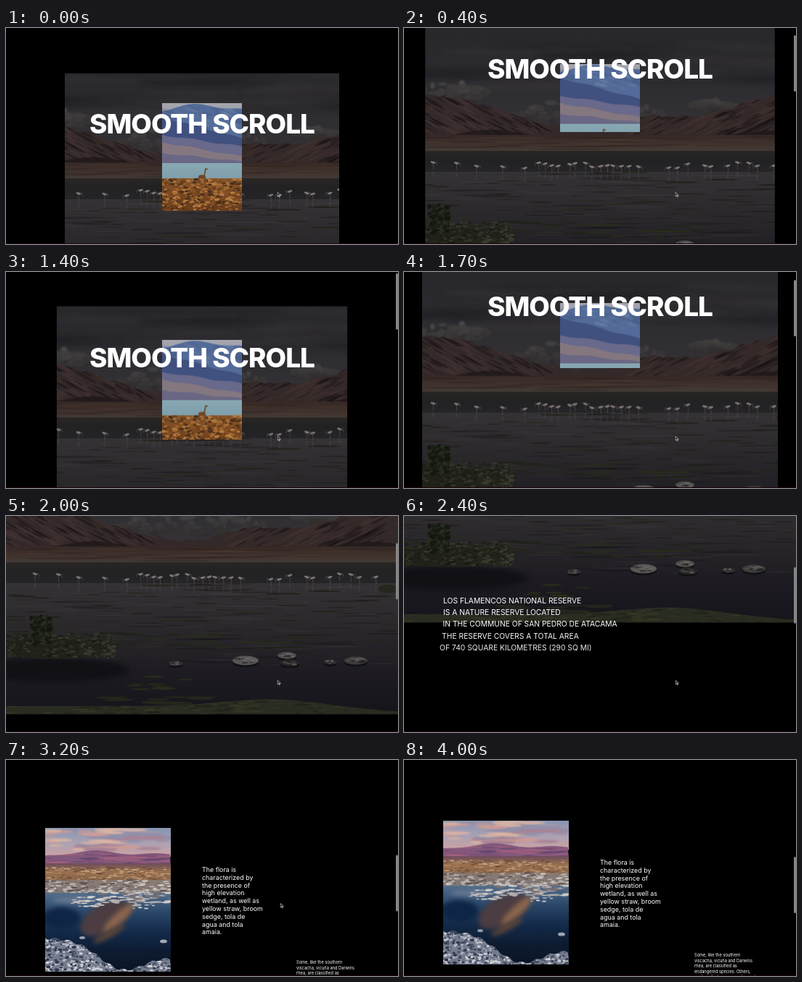
These frames come from a looping animation (540 by 299 pixels, 4100 ms). An HTML page with a canvas:

```html
<!DOCTYPE html>
<html lang="en">
<head>
<meta charset="utf-8">
<title>Smooth scroll</title>
<style>
html, body { margin: 0; width: 100%; height: 100%; overflow: hidden; background: #000; }
#stage { position: relative; width: 540px; height: 299px; overflow: hidden; color: #fff; font-family: Inter, sans-serif; }
#stage > * { position: absolute; left: 0; top: 0; margin: 0; white-space: pre; }
#title { width: 540px; text-align: center; font: 800 37px/37px Inter, sans-serif; letter-spacing: -1px; }
#facts { left: 54px; font-size: 10.3px; line-height: 16.2px; }
#flora { left: 270px; font-size: 8.9px; line-height: 10.8px; }
#fauna { left: 400px; font-size: 5.7px; line-height: 7.6px; }
#stage > #thumb { left: 537px; width: 3px; height: 78px; border-radius: 2px; background: #858585; }
#stage > #edge { top: 298px; width: 540px; height: 1px; background: #1b0509; }
</style>
</head>
<body>
<div id="stage">
<canvas id="view" width="540" height="299"></canvas>
<h1 id="title">SMOOTH SCROLL</h1>
<div id="facts"><div>LOS FLAMENCOS NATIONAL RESERVE</div><div>IS A NATURE RESERVE LOCATED</div><div>IN THE COMMUNE OF SAN PEDRO DE ATACAMA</div><div>THE RESERVE COVERS A TOTAL AREA</div><div>OF 740 SQUARE KILOMETRES (290 SQ MI)</div></div>
<p id="flora">The flora is
characterized by
the presence of
high elevation
wetland, as well as
yellow straw, broom
sedge, tola de
agua and tola
amaia.</p>
<p id="fauna">Some, like the southern
viscacha, vicuña and Darwins
rhea, are classified as
endangered species. Others,
such as Andean goose, horned</p>
<div id="edge"></div>
<div id="thumb"></div>
<svg id="cursor" width="6" height="8" viewBox="0 0 6 8"><path d="M.5.5V6L1.9 4.8 2.9 7 3.8 6.6 2.9 4.5H4.8Z" fill="#111" stroke="#ddd" stroke-width=".7"/></svg>
</div>
<script>
const $ = id => document.getElementById(id);
const clamp = (v, lo = 0, hi = 1) => Math.min(hi, Math.max(lo, v));
const bell = (x, mid, width) => Math.exp(-(((x - mid) / width) ** 2));
const LOOP = 4100, STEP = 100, W = 540, H = 299, BG_H = H * 1.4;

// ---- painting helpers ----
function picture(w, h, seed, draw) {
  const canvas = document.createElement('canvas');
  canvas.width = w;
  canvas.height = h;
  const c = canvas.getContext('2d');
  const rnd = (lo = 0, hi = 1) => {
    seed = (seed * 16807) % 2147483647;
    return lo + (hi - lo) * seed / 2147483647;
  };
  const band = (y0, y1, ...colors) => {
    const g = c.createLinearGradient(0, y0, 0, y1);
    colors.forEach((color, i) => g.addColorStop(i / (colors.length - 1), color));
    c.fillStyle = g;
    c.fillRect(0, y0, w, y1 - y0);
  };
  const blob = (color, x, y, rx, ry, turn = 0) => {
    c.fillStyle = color;
    c.beginPath();
    c.ellipse(x, y, rx, ry, turn, 0, 7);
    c.fill();
  };
  // area below the curve top(x), with optional detail clipped to it
  const ground = (top, bottom, color, detail) => {
    c.save();
    c.fillStyle = color;
    c.beginPath();
    c.moveTo(0, bottom);
    for (let x = 0; x <= w; x += 2) c.lineTo(x, top(x));
    c.lineTo(w, bottom);
    c.fill();
    c.clip();
    if (detail) detail();
    c.restore();
  };
  const scatter = (n, colors, x0, y0, x1, y1, rx, ry, turn = 0) => {
    for (let i = 0; i < n; i++) {
      const k = rnd(.4, 1.2);
      blob(colors[i % colors.length], rnd(x0, x1), rnd(y0, y1), rx * k, ry * k, turn);
    }
  };
  const soft = (px, paint) => {
    c.filter = `blur(${px}px)`;
    paint();
    c.filter = 'none';
  };
  draw({ c, rnd, band, blob, ground, scatter, soft });
  return canvas;
}

const lagoon = picture(W, 419, 11, ({ c, rnd, band, blob, ground, scatter, soft }) => {
  band(0, 190, '#262629', '#2b2a2e', '#353337');
  soft(3, () => scatter(30, ['rgba(75,70,70,.16)', 'rgba(22,22,28,.2)'], 0, 60, W, 125, 90, 5));

  const cloud = (cx, cy, rx, ry) => soft(1.2, () => {
    for (let i = 0; i < 70; i++) {
      const u = rnd(-1, 1), v = rnd(-1, 1) * (1 - u * u), light = 58 - 13 * v + rnd(-5, 5);
      blob(`rgb(${light},${light - 2},${light - 2})`, cx + u * rx, cy + v * ry, rnd(3, 9), rnd(2, 5));
    }
  });
  cloud(65, 128, 55, 15);
  cloud(255, 156, 105, 20);
  cloud(425, 146, 30, 8);

  const ridge = x => 185 - 53 * bell(x, 40, 135) - 17 * bell(x, 335, 55) - 60 * bell(x, 560, 155)
    + 1.3 * Math.sin(x / 7) + Math.sin(x / 3.1);
  ground(ridge, 200, '#342929', () => {
    scatter(160, ['rgba(70,54,53,.4)', 'rgba(22,17,20,.45)'], 0, 135, 200, 185, 15, 2, .5);
    scatter(160, ['rgba(68,50,48,.4)', 'rgba(20,16,18,.45)'], 300, 130, W, 185, 15, 2, -.45);
  });
  ground(x => 190 - 11 * bell(x, 120, 55) - 10 * bell(x, 505, 60), 200, 'rgba(30,23,25,.75)');
  band(186, 208, '#352825', '#3e302b', '#433a35');
  scatter(40, ['rgba(85,65,55,.25)', 'rgba(35,26,24,.3)'], 0, 188, W, 206, 45, 1);
  band(208, 237, '#282724', '#222123', '#252427');
  band(237, 419, '#353235', '#2b282c', '#1e1c22', '#15141a');
  scatter(110, ['rgba(75,70,72,.2)', 'rgba(12,12,16,.3)'], 0, 240, W, 350, 32, 1);
  scatter(90, ['#25251f', '#1f201a', '#2b2a22'], 0, 238, W, 322, 20, 1);
  scatter(26, ['#292b1d', '#20231a'], 150, 306, 420, 330, 20, 1.4);
  scatter(9, ['#262b1a'], 160, 365, 250, 384, 14, 1.6);

  const flock = (n, x0, x1) => {
    for (let i = 0; i < n; i++) {
      const x = x0 + (x1 - x0) * (i + rnd(-.3, .3)) / (n - 1), y = 227 + rnd(-4, 5), dir = rnd() < .5 ? -1 : 1;
      c.lineWidth = .6;
      c.strokeStyle = '#5f5858';
      c.beginPath();
      c.moveTo(x, y + 1);
      c.lineTo(x + .5, y + 10);
      c.moveTo(x + 3 * dir, y);
      c.quadraticCurveTo(x + 6 * dir, y - 3, x + 5 * dir, y + 4);
      c.stroke();
      blob('#7d7575', x, y, 3.5, 1.5, .3 * dir);
      blob('rgba(110,102,104,.15)', x, y + 16, 1.5, 4);
    }
  };
  flock(5, 35, 163);
  flock(14, 183, 323);
  flock(10, 364, 505);

  soft(4, () => blob('#111015', 65, 357, 105, 17));
  blob('#20211a', 65, 326, 90, 16);
  scatter(330, ['#292b20', '#191b15', '#33342a', '#202319'], 0, 307, 148, 339, 3.5, 1.6);
  scatter(80, ['#393a2f', '#23251c'], 100, 320, 152, 340, 3, 1.6);
  scatter(190, ['#1c2017', '#282c20', '#14170f'], 34, 282, 62, 322, 3, 2.5);
  blob('#26271f', 526, 245, 13, 6);

  const rock = (x, y, r, light) => {
    blob('#111115', x, y + 3, r, r * .35);
    blob(`rgb(${light},${light - 2},${light - 3})`, x, y, r, r * .36);
    scatter(14, ['rgba(125,120,118,.4)', 'rgba(25,25,29,.45)'], x - r * .7, y - r * .2, x + r * .7, y + r * .25, r * .25, 1.2);
  };
  rock(330, 344, 18, 88);
  rock(387, 337, 13, 82);
  rock(391, 347, 13, 42);
  rock(482, 344, 16, 62);
  rock(447, 346, 9, 55);
  rock(234, 348, 9, 70);

  scatter(14, ['#23261c'], 130, 394, 310, 404, 20, 2);
  ground(x => 407 - 11 * bell(x, 370, 95) + 8 * (x / W) ** 4, 419, '#292c20', () =>
    scatter(160, ['#333624', '#21241a'], 0, 396, W, 419, 8, 1.2));
});

const vicuna = picture(110, 149, 5, ({ c, band, blob, ground, scatter, soft }) => {
  const layer = (color, left, right) => ground(x => left + (right - left) * x / 110 + Math.sin(x / 9), 86, color);
  band(0, 86, '#a4a5ae', '#848b9f');
  ground(x => 14 - 13 * bell(x, 45, 36) - 6 * bell(x, 110, 30), 86, '#536b98');
  soft(1, () => scatter(40, ['rgba(125,145,180,.35)', 'rgba(50,66,112,.25)'], 5, 6, 110, 36, 10, 2, .3));
  layer('#40507f', 19, 49);
  layer('#68698b', 44, 60);
  layer('#84777f', 54, 74);
  layer('#696784', 69, 81);
  band(83, 105, '#88a8b3', '#7e9eac');
  band(104, 149, '#885a31', '#794720', '#653a1b');
  scatter(420, ['#a36b35', '#6d421f', '#49301b', '#b47b40', '#875021'], 0, 105, 110, 149, 3.2, 1.7);
  c.strokeStyle = '#6f4829';
  c.lineWidth = 1.7;
  blob('#6f4829', 55, 102, 5, 2.8);
  c.beginPath();
  for (const x of [51, 59]) {
    c.moveTo(x, 102);
    c.lineTo(x, 111);
  }
  c.moveTo(58, 101);
  c.lineTo(60, 91);
  c.lineTo(63, 91.5);
  c.stroke();
});

const saltFlat = picture(173, 199, 23, ({ band, blob, ground, scatter, soft }) => {
  band(0, 40, '#8795b2', '#a9a1b4', '#cda3a3');
  soft(1, () => scatter(50, ['#cb9c99', '#9190aa', '#d9b4a4', '#a98394'], 0, 2, 173, 30, 22, 2.5));
  ground(x => 38 - 7 * bell(x, 70, 32) - 3 * bell(x, 150, 25), 55, '#83587b', () =>
    scatter(35, ['rgba(180,100,125,.4)', 'rgba(75,58,105,.35)'], 0, 36, 173, 49, 16, 1.5));
  band(49, 73, '#6c4c5b', '#99704e', '#856348');
  scatter(280, ['#b48d6b', '#6b4b37', '#9d7250', '#c7a685'], 0, 54, 173, 75, 3.5, .8);
  band(72, 92, '#8b7a6f', '#817c80');
  scatter(260, ['#bcb3ae', '#81746f', '#cfc7c2', '#5f5656'], 0, 72, 173, 92, 4, 1.1);
  band(90, 199, '#526d8c', '#294668', '#132a49', '#0d1b31', '#0b1424');
  soft(3, () => {
    blob('#4c3d42', 83, 125, 38, 20, -.5);
    blob('#89654d', 102, 124, 29, 7, -.75);
    blob('#574539', 88, 147, 25, 5, -.5);
    blob('#6b7b93', 40, 100, 30, 4);
    blob('#0f2545', 22, 125, 26, 15);
  });
  scatter(80, ['#b1acad', '#d0cac5', '#777174'], 75, 88, 173, 104, 6, 1.2);
  scatter(26, ['#bdb9b9', '#d8d4d0'], 36, 95, 78, 109, 5, 1);
  scatter(10, ['#a8a9b0', '#cfcdce'], 120, 103, 172, 112, 4, 1.2);
  blob('#a3a6b0', 163, 157, 5, 2.5);
  blob('#969dab', 51, 152, 4, 2);
  const shore = x => 153 + 34 * bell(x, 105, 45) + 25 * (x / 173) ** 2 + 1.5 * Math.sin(x / 3);
  ground(shore, 199, '#747b8d', () =>
    scatter(900, ['#b1b6c1', '#444b60', '#d2d3d8', '#757d91', '#2c3449'], 0, 150, 173, 199, 2.5, 1.6));
});

// ---- motion ----
const scrollKeys = [[0, 0], [800, 76], [1480, 4], [2000, 144], [2400, 271], [3200, 504], [4100, 514]];

// monotone cubic through the keys
function scrollAt(t) {
  const k = scrollKeys, n = k.length - 1;
  const rate = i => (k[i + 1][1] - k[i][1]) / (k[i + 1][0] - k[i][0]);
  const slope = i => {
    if (i === 0 || i === n) return 0;
    const a = rate(i - 1), b = rate(i);
    return a * b > 0 ? 2 * a * b / (a + b) : 0;
  };
  let i = 0;
  while (i < n - 1 && t >= k[i + 1][0]) i++;
  const d = k[i + 1][0] - k[i][0], u = (t - k[i][0]) / d, v = 1 - u;
  return v * v * (1 + 2 * u) * k[i][1] + u * u * (3 - 2 * u) * k[i + 1][1] + u * v * d * (v * slope(i) - u * slope(i + 1));
}

const view = $('view').getContext('2d');
const factLines = [...$('facts').children];
const move = (el, x, y) => { el.style.transform = `translate(${x}px, ${y}px)`; };
const show = (el, on) => { el.style.visibility = on ? 'visible' : 'hidden'; };

function render(t) {
  const s = scrollAt(t);
  const open = 1 - (1 - clamp(s / 95)) ** 2;
  const inset = .15 * (1 - open);
  const introH = 149 - 86 * open;

  view.clearRect(0, 0, W, H);
  view.save();
  view.beginPath();
  view.rect(inset * W, inset * BG_H - s, W * (1 - 2 * inset), BG_H * (1 - 2 * inset));
  view.clip();
  view.drawImage(lagoon, 0, -s);
  view.restore();
  view.drawImage(vicuna, 0, 0, 110, introH, 215, 104 - 1.43 * s, 110, introH);
  view.drawImage(saltFlat, 54, 598 - s);

  move($('title'), 0, 113.5 - 2 * s);
  move($('facts'), 0, 108.9 + (271 - s) * 1.5);
  factLines.forEach((line, i) => {
    const left = (1 - clamp((s - 140 - 16 * i) / 142)) ** 4;
    line.style.opacity = 1 - left;
    move(line, -63 * left, 0);
  });
  move($('flora'), 0, 650.6 - s);
  move($('fauna'), 0, 780.2 - s);

  move($('thumb'), 0, s * .261);
  show($('thumb'), t > 0);
  const lift = clamp((t - 2800) / 400);
  move($('cursor'), 373.5 + 4 * lift, 227 - 29 * lift);
  show($('cursor'), t < 3700);
}

const start = performance.now();
function tick(now) {
  const t = Math.max(0, now - start) % LOOP;
  render(Math.floor(t / STEP) * STEP);
  requestAnimationFrame(tick);
}
render(0);
requestAnimationFrame(tick);
</script>
</body>
</html>
```
